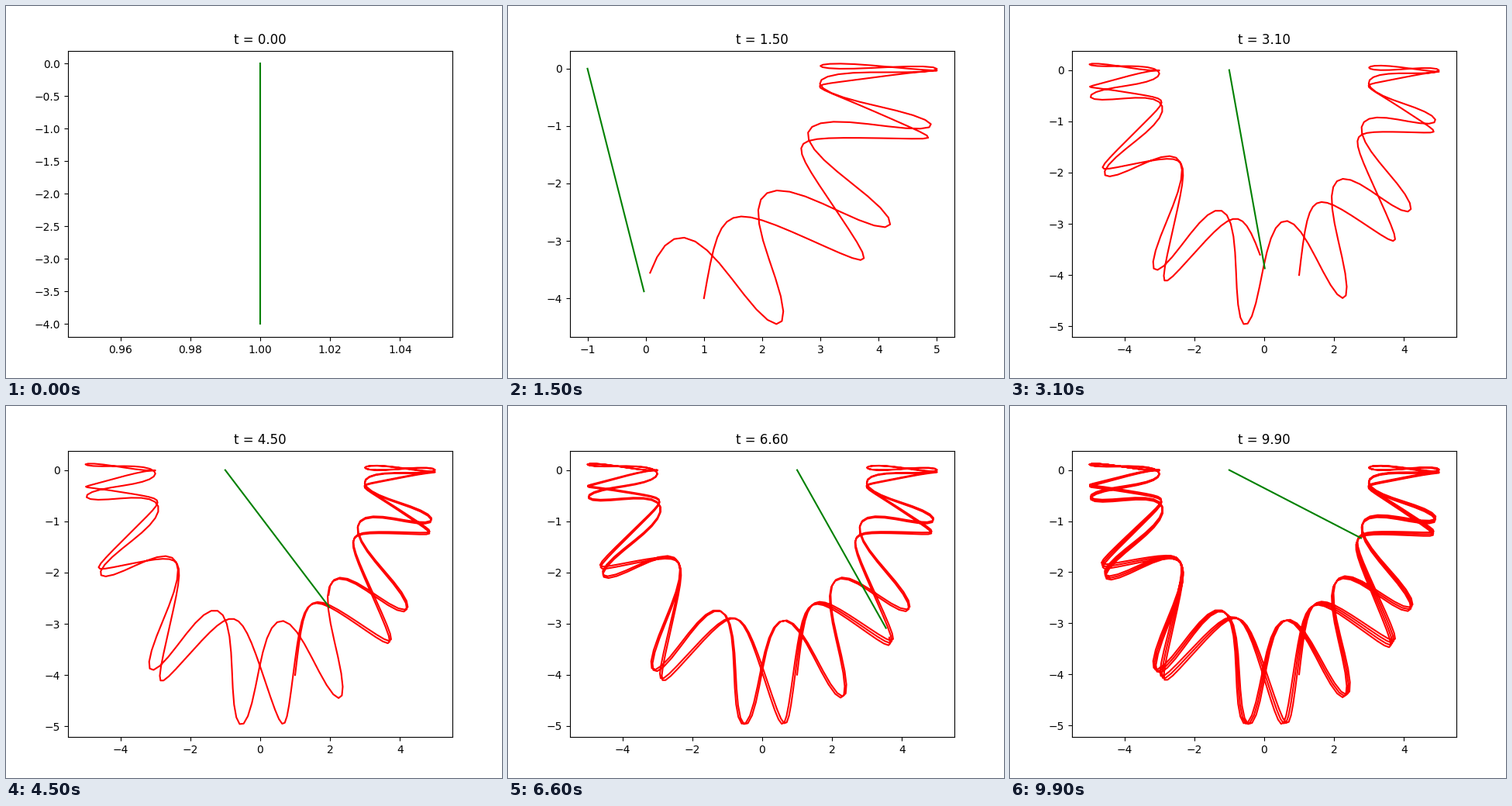
A matplotlib script that plays this animation: 640x480 px, repeating every 10 s.

```python
"""Pendulum hung from the rim of a spinning wheel, with the path of its bob."""
import numpy as np
import matplotlib.pyplot as plt
from matplotlib.animation import FuncAnimation

RIM, ROD = 1.0, 4.0
OMEGA = 10 * np.pi
DT, STEPS = 0.01, 1000
FRAMES = 100
STRIDE = STEPS // FRAMES

# Rod angles the swing passes through: time -> radians from the vertical
WAYPOINTS = {0.17: 0.893, 0.7: 1.583, 1.5: 0.244, 2.3: -1.599, 3.1: 0.258,
             4.5: 0.837, 6.6: 0.687, 8.0: -0.454, 9.9: 1.235}


def swing(pull, speed, substeps=2):
    """Rod angle at every step (RK4); pull is gravity / rod length."""
    pull, speed = np.broadcast_arrays(pull, speed)
    kick = OMEGA ** 2 * RIM / ROD
    h = DT / substeps

    def accel(angle, t):
        return kick * np.cos(angle - OMEGA * t) - pull * np.sin(angle)

    a, v = np.zeros(pull.shape), speed.astype(float)
    path = [a]
    for n in range((STEPS - 1) * substeps):
        t = n * h
        k1 = accel(a, t)
        v2 = v + h / 2 * k1
        k2 = accel(a + h / 2 * v, t + h / 2)
        v3 = v + h / 2 * k2
        k3 = accel(a + h / 2 * v2, t + h / 2)
        v4 = v + h * k3
        k4 = accel(a + h * v3, t + h)
        a = a + h / 6 * (v + 2 * v2 + 2 * v3 + v4)
        v = v + h / 6 * (k1 + 2 * k2 + 2 * k3 + k4)
        if (n + 1) % substeps == 0:
            path.append(a)
    return np.array(path)


def calibrate(pull=5.0, speed=1.4):
    """Zooming grid search for the pull and start speed that fit best."""
    index = [round(t / DT) for t in WAYPOINTS]
    target = np.array(list(WAYPOINTS.values()))[:, None, None]
    span = np.linspace(-1, 1, 31)
    for size in (0.4, 0.1, 0.025):
        pulls, speeds = np.meshgrid(pull + size * span, speed + size * span)
        error = ((swing(pulls, speeds)[index] - target) ** 2).sum(axis=0)
        best = np.unravel_index(error.argmin(), error.shape)
        pull, speed = pulls[best], speeds[best]
    return pull, speed


time = np.arange(STEPS) * DT
theta = swing(*calibrate())
px, py = RIM * np.cos(OMEGA * time), RIM * np.sin(OMEGA * time)
bx, by = px + ROD * np.sin(theta), py - ROD * np.cos(theta)

fig, ax = plt.subplots(figsize=(6.4, 4.8), dpi=100)


def draw(frame):
    i = frame * STRIDE
    ax.clear()
    ax.plot(bx[:i], by[:i], "r")
    ax.plot([px[i], bx[i]], [py[i], by[i]], "g")
    ax.set_title(f"t = {time[i]:.2f}")


anim = FuncAnimation(fig, draw, frames=FRAMES, interval=100,
                     init_func=lambda: None, repeat=True)
plt.show()
```
